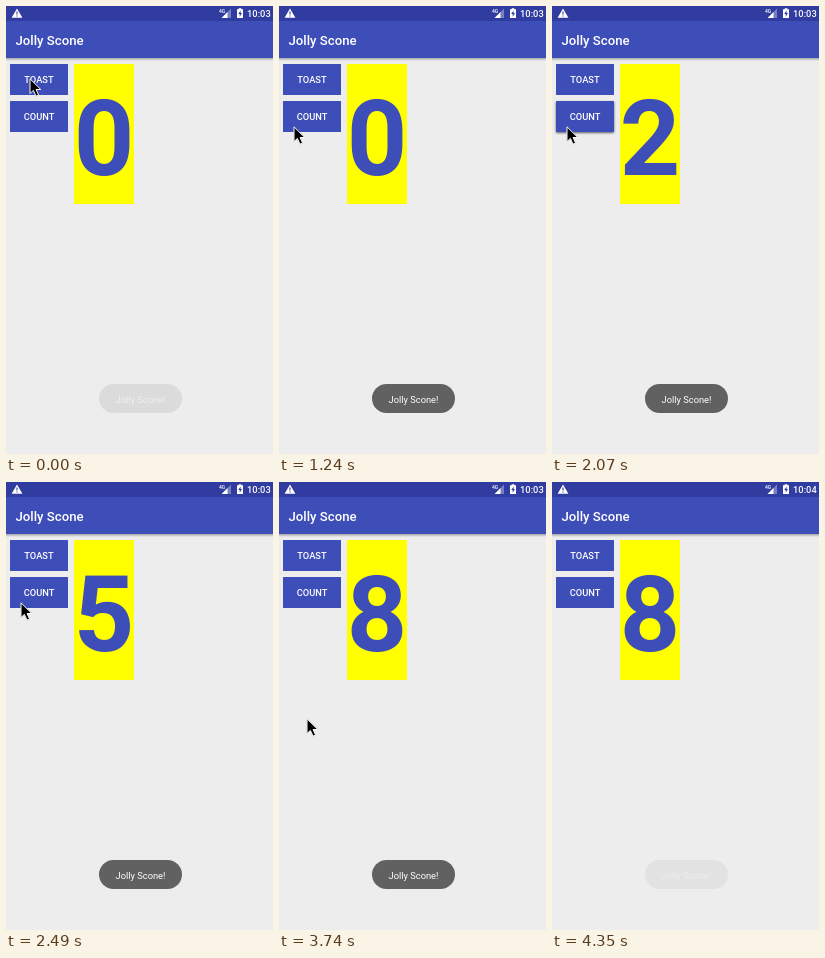
Animation, 267 px wide and 448 px high, one loop 4.71 s. Source, as an HTML page:

```html
<!DOCTYPE html>
<html lang="en">
<head>
<meta charset="utf-8">
<title>Jolly Scone</title>
<style>
  html, body { margin: 0; width: 100%; height: 100%; overflow: hidden; background: #ededed; }
  svg { display: block; width: 100vw; height: 100vh; }
  text { font: 500 9.3px Roboto, sans-serif; fill: #fff; }
  .mid { text-anchor: middle; }
  .blue { fill: #3e4eb8; }
  .button { filter: drop-shadow(0 .8px .7px #0007); }
  .button.pressed { filter: drop-shadow(0 1.2px 1.2px #0009); }
</style>
</head>
<body>
<svg viewBox="0 0 267 448">
  <defs>
    <linearGradient id="shade" x2="0" y2="1">
      <stop stop-color="#000" stop-opacity=".3"/>
      <stop offset="1" stop-color="#000" stop-opacity="0"/>
    </linearGradient>
  </defs>
  <rect width="267" height="448" fill="#ededed"/>

  <!-- status bar -->
  <rect width="267" height="15.5" fill="#303c9f"/>
  <path d="M11 2.4L16.4 11.8H5.6Z" fill="#fff"/>
  <path d="M11 5.6V8.6M11 9.5V10.6" stroke="#303c9f" stroke-width="1.1"/>
  <text x="213" y="7" style="font-size:5px">4G</text>
  <path d="M225 2.6V12H215.6Z" fill="#fff" opacity=".35"/>
  <path d="M221.5 6.1V12H215.6Z" fill="#fff"/>
  <path d="M231 3.2H232.7V2.2H235.3V3.2H237V12H231Z" fill="#fff"/>
  <path d="M234.6 4.4L232.2 8H233.7V10.8L236 7H234.6Z" fill="#303c9f"/>
  <text id="clock" x="264.7" y="11" text-anchor="end"></text>

  <!-- app bar -->
  <rect class="blue" y="15" width="267" height="37"/>
  <rect y="52" width="267" height="3" fill="url(#shade)"/>
  <text x="9.5" y="39" style="font-size:13.2px">Jolly Scone</text>

  <!-- content -->
  <rect class="blue button" x="4" y="58" width="58" height="31" rx=".8"/>
  <text class="mid" x="33" y="77">TOAST</text>
  <rect id="countButton" class="blue button" x="4" y="95" width="58" height="31" rx=".8"/>
  <text class="mid" x="33" y="114">COUNT</text>
  <rect x="68" y="58" width="60" height="140" fill="#ff0"/>
  <text id="count" class="mid blue" x="98" y="169.3" style="font-size:105.6px;font-weight:700"></text>

  <g id="toast">
    <rect x="93" y="378" width="83" height="29" rx="14.5" fill="#616161"/>
    <text class="mid" x="134.5" y="396.5" style="font-weight:400">Jolly Scone!</text>
  </g>

  <path id="cursor" d="M1 .8V15.6L4.4 12.4L7 18.2L9.6 17.1L7.1 11.5H11.8Z"
    stroke="#fff" stroke-width="1" stroke-linejoin="round"
    style="filter:drop-shadow(0 .5px .5px #0005)"/>
</svg>
<script>
const LOOP = 4710;
const el = id => document.getElementById(id);

// Each track lists [start time, value]; values hold until the next entry.
const tracks = {
  toast: [[0, .12], [200, .65], [410, 1], [4150, .5], [4350, .07]],
  count: [[0, 0], [1860, 1], [2070, 2], [2280, 3], [2490, 5], [2700, 6], [3110, 8]],
  cursor: [[0, [23, 72]], [1030, [23, 96]], [1240, [14, 120]],
           [3740, [27, 236]], [3940, [205, 430]], [4150, null]],
  pressed: [[0, false], [1860, true], [2280, false]],
  clock: [[0, '10:03'], [4350, '10:04']]
};
const at = (name, t) => tracks[name].findLast(([start]) => start <= t)[1];

function draw(now) {
  const t = now % LOOP;
  const position = at('cursor', t);
  el('toast').setAttribute('opacity', at('toast', t));
  el('count').textContent = at('count', t);
  el('clock').textContent = at('clock', t);
  el('countButton').classList.toggle('pressed', at('pressed', t));
  el('cursor').setAttribute('visibility', position ? 'visible' : 'hidden');
  if (position) el('cursor').setAttribute('transform', `translate(${position})`);
}

const begin = performance.now();
function tick() {
  draw(performance.now() - begin);
  requestAnimationFrame(tick);
}
tick();
</script>
</body>
</html>
```
